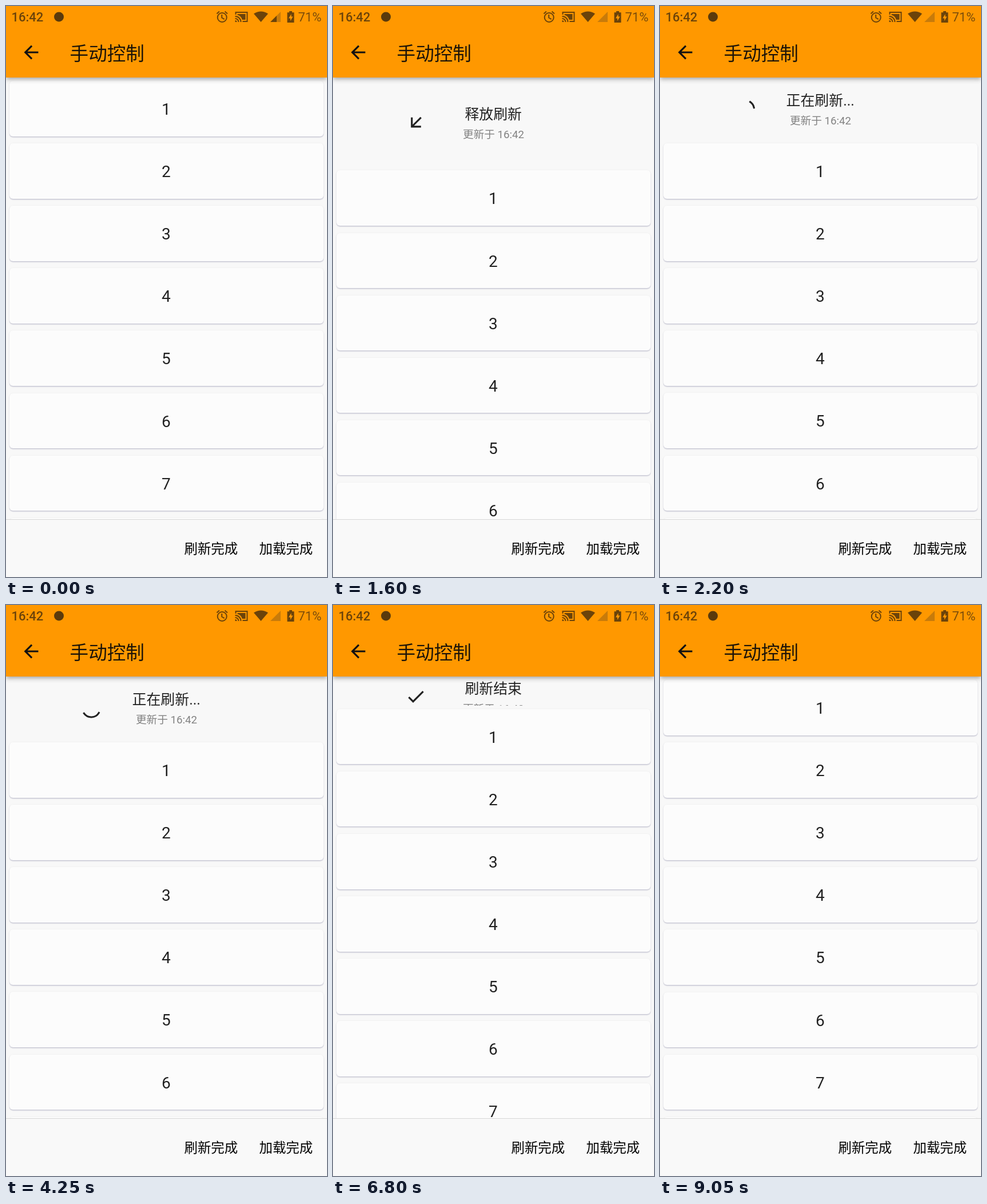
An HTML page that plays this animation: 561x998 px, repeating every 9.2 s.

```html
<!DOCTYPE html>
<html lang="zh-CN">
<head>
<meta charset="utf-8">
<style>
html, body { margin: 0; width: 100%; height: 100%; overflow: hidden; background: #f9f9f9; }
#stage { position: relative; width: 561px; height: 998px; overflow: hidden; background: #f8f8f8;
  font-family: Roboto, "Noto Sans CJK SC", "Noto Sans CJK", sans-serif; }
#stage > * { position: absolute; left: 0; width: 561px; }
#view { top: 125px; height: 772px; overflow: hidden; }
#head { position: absolute; top: 0; width: 561px; overflow: hidden; }
#list { position: absolute; top: 0; width: 561px; }
.card { position: absolute; left: 6.2px; width: 548.6px; height: 96.6px; border-radius: 6px; background: #fcfcfc;
  box-shadow: 0 1.6px 1.6px rgba(50,50,110,.22), 0 .5px 3px rgba(0,0,0,.07); }
.card svg { overflow: visible; }
#bar { top: 0; height: 125px; background: #ff9800;
  box-shadow: 0 3px 6px -1px rgba(0,0,0,.2), 0 5px 8px rgba(0,0,0,.11), 0 1px 12px rgba(0,0,0,.08); }
#foot { top: 897px; height: 101px; background: #f9f9f9; box-sizing: border-box; border-top: 1px solid #d6d6d6; }
svg { display: block; }
</style>
</head>
<body>
<div id="stage">
  <div id="view">
    <div id="head">
      <svg width="561" height="300"><g id="info">
        <path id="pull" d="M20 11H7.83l5.59-5.59L12 4l-8 8 8 8 1.41-1.41L7.83 13H20z" fill="#212121"/>
        <path id="spin" fill="none" stroke="#212121" stroke-width="3.1" stroke-linecap="square"/>
        <path id="check" fill="#212121" transform="translate(145 .5) scale(1.558) translate(-12.2 -12.3)"
          d="M9 16.17L4.83 12l-1.42 1.41L9 19 21 7l-1.41-1.41z"/>
        <text id="state" x="280.2" y="-5.5" font-size="24.9" text-anchor="middle" fill="#212121"></text>
        <text x="280.5" y="27.5" font-size="18.7" text-anchor="middle" fill="#828282">更新于 16:42</text>
      </g></svg>
    </div>
    <div id="list"></div>
  </div>
  <div id="bar">
    <svg width="561" height="125">
      <g fill="#6b430a" font-size="22">
        <text x="9.5" y="27" font-weight="500">16:42</text>
        <text x="510.5" y="27" fill="#7a4c0a">71%</text>
        <circle cx="92.5" cy="19" r="8.5" fill="#5a3a0c"/>
        <g fill="none" stroke="#6b430a" stroke-width="2">
          <circle cx="377.7" cy="20" r="8"/>
          <path d="M377.2 15v5.5l4.5 2.7M368.4 13.4l4.5-3.8M387 13.4l-4.5-3.8"/>
          <path d="M401.5 15v-4h20v16h-8M400.5 22a6 6 0 0 1 6 6M400.5 18a10 10 0 0 1 10 10"/>
        </g>
        <path d="M400.5 25v3h3a3 3 0 0 0-3-3M404.5 14h14v10h-5.6a13 13 0 0 0-8.4-8.4z"/>
        <path d="M445.5 28L433 13.5Q445.5 5.5 458 13.5z"/>
        <path d="M480 10v18h-18z" fill="#c87b0a"/>
        <path id="signal" d="M473 17v11h-11z"/>
        <path d="M495 9h5v2.3h3.5V29h-12V11.3h3.5z"/>
        <path d="M498.5 14l-4.5 7.5h3V26l4.5-7.5h-3z" fill="#ff9800"/>
      </g>
      <path fill="#111" transform="translate(44 81) scale(1.558) translate(-12 -12)"
        d="M20 11H7.83l5.59-5.59L12 4l-8 8 8 8 1.41-1.41L7.83 13H20z"/>
      <text x="111.6" y="94.5" font-size="32.6" fill="#1c1408">手动控制</text>
    </svg>
  </div>
  <div id="foot">
    <svg width="561" height="100">
      <rect id="press" x="299" y="23" width="118" height="56" rx="3" fill="#000"/>
      <g font-size="23.4" fill="#000">
        <text x="311.5" y="58.5">刷新完成</text>
        <text x="442.5" y="58.5">加载完成</text>
      </g>
    </svg>
  </div>
</div>
<script>
const $ = id => document.getElementById(id);
const LOOP = 9200, STEP = 50, ITEM = 109.07, REST = 109;
const ARMED = 1550, LOADING = 2090, DONE = 5850;

for (let i = 0; i < 8; i++) {
  const card = document.createElement('div');
  card.className = 'card';
  card.innerHTML = `<svg width="548" height="96"><text x="273.8" y="59.2" font-size="28"
    text-anchor="middle" fill="#212121">${i + 1}</text></svg>`;
  card.style.top = 6.2 + i * ITEM + 'px';
  $('list').append(card);
}

const span = (t, a, b) => Math.min(1, Math.max(0, (t - a) / (b - a)));
const smooth = u => u * u * (3 - 2 * u);
const smoother = u => u * u * u * (u * (6 * u - 15) + 10);

// cubic-bezier(.4, 0, .2, 1)
function fastOutSlowIn(x) {
  let lo = 0, hi = 1, s = .5;
  for (let i = 0; i < 20; i++) {
    s = (lo + hi) / 2;
    const bx = 1.2 * s * (1 - s) ** 2 + .6 * s * s * (1 - s) + s ** 3;
    if (bx < x) lo = s; else hi = s;
  }
  return s * s * (3 - 2 * s);
}

function pullOffset(t) {
  if (t < 1800) return 179.4 * smoother(span(t, 1200, 1750));
  if (t < 6500) return REST + (179.4 - REST) * (1 - span(t, 1800, 2090)) ** 3;
  return REST * (1 - smooth(span(t, 6580, 7000)));
}

// Indeterminate ring: one sweep per second
function ringPath(ms) {
  const step = Math.floor(ms / 1000), f = ms / 1000 - step;
  const head = fastOutSlowIn(span(f, 0, .5)), tail = fastOutSlowIn(span(f, .5, 1));
  const from = Math.PI * (-.5 + 1.5 * tail + 1.7 * f - .8 * step);
  const sweep = Math.max(1.5 * Math.PI * (head - tail), .001);
  const at = a => `${149 + 15.5 * Math.cos(a)} ${1 + 15.5 * Math.sin(a)}`;
  return `M${at(from)}A15.5 15.5 0 ${sweep > Math.PI ? 1 : 0} 1 ${at(from + sweep)}`;
}

const show = (id, on) => $(id).style.display = on ? '' : 'none';

function draw(t) {
  const off = pullOffset(t), loading = t >= LOADING && t < DONE;
  $('head').style.height = off + 'px';
  $('list').style.top = off + 'px';
  $('info').setAttribute('transform', `translate(0 ${Math.max(off, 70) / 2})`);
  $('state').textContent = t < ARMED ? '拉动刷新' : t < LOADING ? '释放刷新' : loading ? '正在刷新...' : '刷新结束';
  show('pull', t < LOADING);
  show('spin', loading);
  show('check', t >= DONE);
  const turn = -90 + 180 * span(t, ARMED, ARMED + 200);
  $('pull').setAttribute('transform', `translate(145 .5) rotate(${turn}) scale(1.558) translate(-12 -12)`);
  if (loading) $('spin').setAttribute('d', ringPath(t - LOADING));
  $('press').setAttribute('opacity', .12 * span(t, 5700, 5800) * (1 - span(t, 5850, 5950)));
  show('signal', t < 450);
}

const start = performance.now();
function tick() {
  const t = (performance.now() - start) % LOOP;
  draw(Math.floor(t / STEP) * STEP);
  requestAnimationFrame(tick);
}
tick();
</script>
</body>
</html>
```
